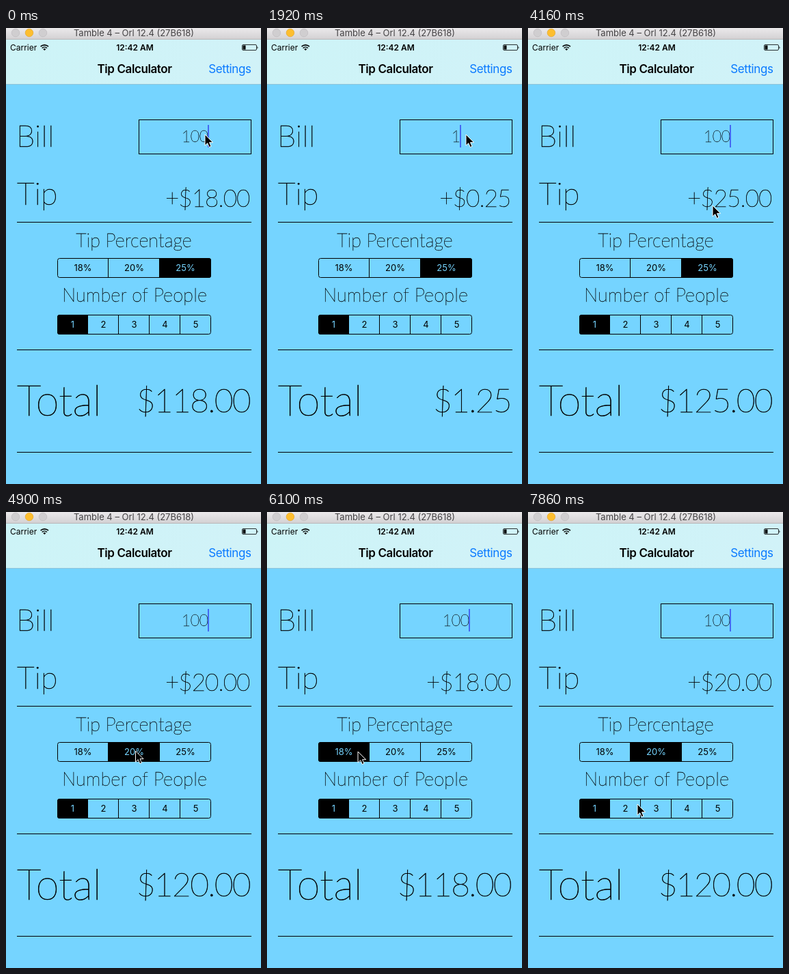
These frames come from a looping animation (373x668 px, 8 s). An HTML page:

```html
<!DOCTYPE html>
<html lang="en">
<head>
<meta charset="utf-8">
<title>Tip Calculator</title>
<style>
  html, body { margin: 0; width: 100%; height: 100%; overflow: hidden; background: #75d4ff; }
  svg { display: block; width: 100vw; height: 100vh; }
  text { font-family: Inter, Roboto, sans-serif; white-space: pre; }
  .thin text, text.thin { font-family: Lato, sans-serif; font-weight: 100; stroke: #000; stroke-width: .011em; }
  .mid { text-anchor: middle; }
  .end { text-anchor: end; }
  .seg text { font-size: 13px; text-anchor: middle; }
  .nav { font-size: 17px; letter-spacing: -.41px; }
  .status { font-size: 12px; }
  .line { fill: none; stroke: #000; }
  text#ghost { stroke: none; opacity: .35; font-weight: 300; }
</style>
</head>
<body>
<svg viewBox="0 0 373 668" xmlns="http://www.w3.org/2000/svg">
  <defs>
    <linearGradient id="chrome" x2="0" y2="1">
      <stop stop-color="#ebe9eb"/><stop offset="1" stop-color="#d2d0d2"/>
    </linearGradient>
    <linearGradient id="bar">
      <stop stop-color="#cdf4f7"/><stop offset="1" stop-color="#d1f2f8"/>
    </linearGradient>
  </defs>
  <rect width="373" height="668" fill="#75d4ff"/>

  <rect y="17" width="373" height="65" fill="url(#bar)"/>
  <rect y="82" width="373" height="1" fill="#8fc3d8"/>
  <rect width="373" height="17" fill="url(#chrome)"/>
  <rect y="16" width="373" height="1" fill="#b9b7b9"/>
  <g stroke-width=".6">
    <circle cx="14" cy="7" r="5.8" fill="#d0ced0" stroke="#bab8ba"/>
    <circle cx="34" cy="7" r="5.8" fill="#fdbe2f" stroke="#dfa023"/>
    <circle cx="54" cy="7" r="5.8" fill="#d0ced0" stroke="#bab8ba"/>
  </g>
  <text class="mid" x="187" y="12" font-size="13" fill="#454345">Tamble 4 – Orl 12.4 (27B618)</text>

  <text class="status" x="6" y="33">Carrier</text>
  <g fill="none" stroke="#000" stroke-width="1.6">
    <path d="M50.6 27.2a8.2 8.2 0 0 1 11.4 0M52.7 29.5a5.2 5.2 0 0 1 7.2 0"/>
    <path d="M56.3 33l-2-2.1a2.9 2.9 0 0 1 4 0z" fill="#000" stroke="none"/>
  </g>
  <text class="status mid" x="188.5" y="33" font-weight="600">12:42 AM</text>
  <rect class="line" x="345.5" y="24.5" width="21" height="8" rx="1.5" stroke-width=".8"/>
  <rect x="346.5" y="25.5" width="4" height="6"/>
  <path d="M367.5 26.5q1.8 2 0 4z"/>
  <text class="nav mid" x="188" y="66" font-weight="600">Tip Calculator</text>
  <text class="nav end" x="358.5" y="66" fill="#0a7aff">Settings</text>

  <g class="thin">
    <text x="15" y="173.5" font-size="44" letter-spacing=".4">Bill</text>
    <text x="16" y="258.5" font-size="45">Tip</text>
    <text x="16" y="568" font-size="62">Total</text>
    <text class="mid" x="187" y="320.8" font-size="27">Tip Percentage</text>
    <text class="mid" x="188" y="400.8" font-size="27" letter-spacing=".2">Number of People</text>
    <text id="tip" class="end" x="356.5" y="262.3" font-size="35" letter-spacing="-.9"></text>
    <text id="total" class="end" x="357" y="563.3" font-size="48" letter-spacing="-1.7"></text>
  </g>
  <path class="line" d="M16 284.5H359M16 471.5H359M16 621.5H359"/>

  <rect class="line" x="194.5" y="134.5" width="164" height="50"/>
  <rect id="mark" x="257" y="142" width="40" height="33" fill="#2a6cf0" opacity=".22"/>
  <text id="ghost" class="thin mid" x="277" y="166.5" font-size="24">Enter Amount</text>
  <text id="bill" class="thin mid" x="276.2" y="166.5" font-size="23" letter-spacing="-.4"></text>
  <rect id="caret" y="142" width="2" height="33" fill="#4468f2"/>

  <g id="segs"></g>

  <g id="menu" font-size="14">
    <path d="M200 88H357a8 8 0 0 1 8 8V117a8 8 0 0 1-8 8H286l-9 9-9-9H200a8 8 0 0 1-8-8V96a8 8 0 0 1 8-8z" fill="#1b1f22"/>
    <path d="M243.5 88v37M303.5 88v37" stroke="#8a9094"/>
    <g class="mid" fill="#fff">
      <text x="218" y="112">Cut</text><text x="273" y="112">Copy</text><text x="334" y="112">Paste</text>
    </g>
  </g>

  <path id="arrow" d="M1 1V17.2L4.7 13.7L7.3 19.6L10 18.4L7.5 12.7H12.6Z" stroke="#fff" stroke-linejoin="round"/>
</svg>
<script>
const $ = id => document.getElementById(id);
const LOOP = 8000, START = 132, TICK = 148.46;
const RATES = [.18, .2, .25];

// Each list: [tick, value...], held until the next entry.
const typed = [[0, '100'], [3, ''], [13, '1'], [15, '12'], [16, '123'],
               [20, '12'], [21, '1'], [23, '10'], [25, '100']];
const picked = [[0, 2], [33, 1], [39, 0], [50, 1]];
const pressed = [[0, -1], [32, 1], [33, -1], [38, 0], [39, -1], [49, 1], [50, -1]];
// Pointer stops: [tick, x, y], eased in between.
const path = [[0, 290, 155], [27, 290, 155], [28, 269, 259], [31, 190, 348], [35, 187, 350],
              [38, 132, 350], [43, 132, 350], [46, 140, 409], [49, 178, 352], [50, 178, 352], [53, 159, 427]];

const clamp = v => Math.max(0, Math.min(1, v));
const held = (list, k) => list.filter(e => e[0] <= k).pop()[1];

function pointer(k) {
  const i = path.findIndex(p => p[0] > k);
  if (i < 0) return path[path.length - 1].slice(1);
  const a = path[i - 1], b = path[i], u = (k - a[0]) / (b[0] - a[0]);
  const e = u * u * (3 - 2 * u);
  return [a[1] + (b[1] - a[1]) * e, a[2] + (b[2] - a[2]) * e];
}

function control(id, y, labels) {
  const w = 225 / labels.length;
  const cells = labels.map((s, i) =>
    `<rect x="${75 + i * w}" y="${y}" width="${w}" height="29"/>` +
    `<text x="${75 + (i + .5) * w}" y="${y + 19}">${s}</text>`).join('');
  const bars = labels.slice(1).map((s, i) => `M${Math.floor(75 + (i + 1) * w) - .5} ${y}v29`).join('');
  $('segs').insertAdjacentHTML('beforeend', `<g class="seg" id="${id}">
    <clipPath id="${id}Clip"><rect x="75" y="${y}" width="225" height="29" rx="3.5"/></clipPath>
    <g clip-path="url(#${id}Clip)">${cells}</g>
    <path class="line" d="${bars}"/>
    <rect class="line" x="75.5" y="${y + .5}" width="224" height="28" rx="3"/></g>`);
}

function paint(id, on, down) {
  const cells = $(id).querySelector('g');
  cells.querySelectorAll('rect').forEach((r, i) => {
    r.setAttribute('fill', i === on ? '#000' : i === down ? 'rgba(0,0,0,.16)' : 'none');
  });
  cells.querySelectorAll('text').forEach((t, i) => t.setAttribute('fill', i === on ? '#75d4ff' : '#000'));
}

function caretAlpha(k) {
  if (k > 0 && k < 3) return 0;
  if (k >= 13 && k <= 28) return 1;
  const d = ((k - 9.4 + 3.5) % 7 + 7) % 7 - 3.5;
  return clamp((Math.abs(d) - .7) * 1.3);
}

function draw(t) {
  const k = Math.max(0, Math.floor((t - START) / TICK) + 1);
  const bill = held(typed, k), on = held(picked, k);
  const rate = k < 3 ? RATES[0] : RATES[on];
  $('bill').textContent = bill;
  $('ghost').style.display = bill ? 'none' : '';
  $('tip').textContent = '+$' + (bill * rate).toFixed(2);
  $('total').textContent = '$' + (bill * (1 + rate)).toFixed(2);
  $('caret').setAttribute('x', bill ? 275.5 + 6.5 * bill.length : 205);
  $('caret').setAttribute('opacity', caretAlpha(k));
  $('mark').style.display = k === 1 || k === 2 ? '' : 'none';
  $('menu').setAttribute('opacity', k === 1 || k === 2 ? 1 : k === 3 ? .4 : 0);
  paint('rate', on, held(pressed, k));
  const [x, y] = pointer(k);
  $('arrow').setAttribute('transform', `translate(${x} ${y})`);
}

control('rate', 337, ['18%', '20%', '25%']);
control('people', 420, ['1', '2', '3', '4', '5']);
paint('people', 0, -1);

const began = performance.now();
function loop() {
  draw((performance.now() - began) % LOOP);
  requestAnimationFrame(loop);
}
loop();
</script>
</body>
</html>
```
